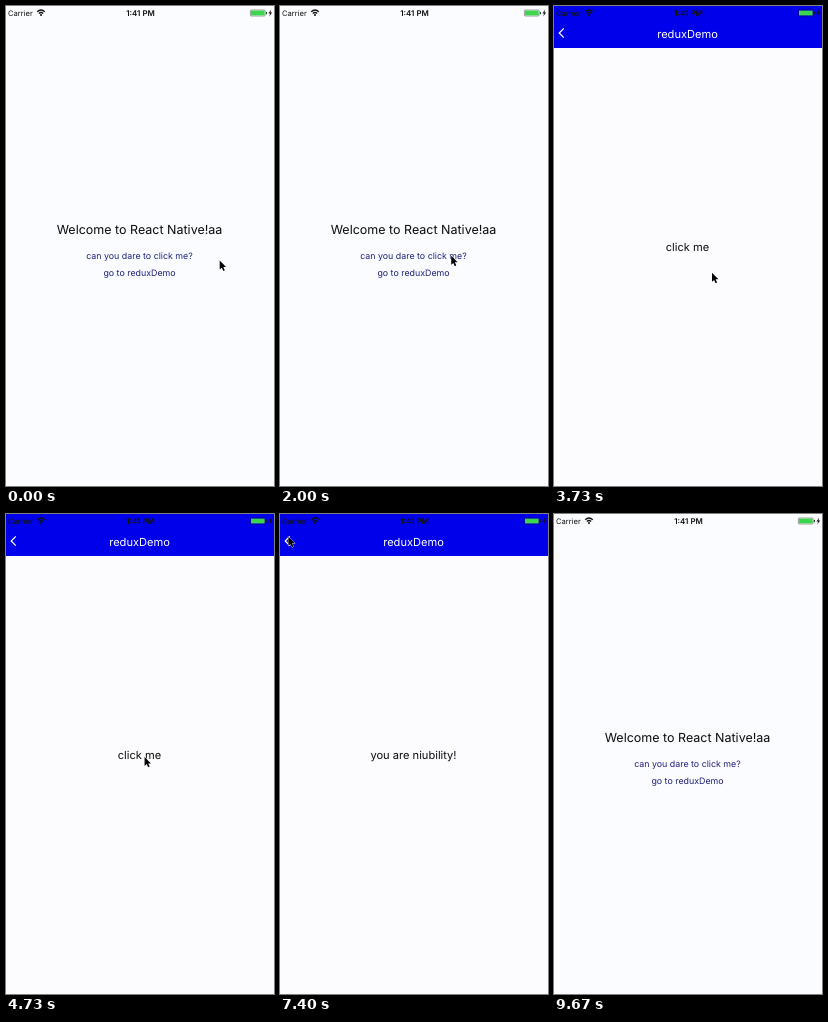
Recreate the animation shown at these times as an HTML page. Size 268x480 px, loop 9.74 s.

```html
<!DOCTYPE html>
<html lang="en">
<head>
<meta charset="utf-8">
<style>
  html, body { margin: 0; width: 100%; height: 100%; overflow: hidden; background: #fcfcfe; }
  svg { display: block; width: 268px; height: 480px; }
  text { font: 11.1px Inter, Roboto, sans-serif; text-anchor: middle; text-rendering: geometricPrecision; }
  .title { font-size: 12.5px; }
  .link { font-size: 8.85px; }
  .status { font-size: 7.6px; }
</style>
</head>
<body>
<svg viewBox="0 0 268 480">
  <g id="home">
    <rect width="268" height="480" fill="#fafcff"/>
    <text class="title" x="133.5" y="228" fill="#0c0c0c">Welcome to React Native!aa</text>
    <g fill="#20207c">
      <text class="link" x="133.5" y="252.7">can you dare to click me?</text>
      <text class="link" x="133.5" y="270">go to reduxDemo</text>
    </g>
  </g>

  <g id="demo">
    <rect width="268" height="480" fill="#fcfcfe"/>
    <rect width="268" height="42" fill="#0000ea"/>
    <path d="M9.8 22.4 5.2 27l4.6 4.6" fill="none" stroke="#fff" stroke-width="1.2"/>
    <text x="133.5" y="31.5" fill="#fff">reduxDemo</text>
    <text id="message" x="133.5" y="245" fill="#0c0c0c"></text>
  </g>

  <g id="statusBar" fill="#111">
    <text class="status" x="2" y="10" style="text-anchor: start">Carrier</text>
    <path d="M31.2 5.8q3.8-3.6 7.6 0M32.8 7.5q2.2-2 4.4 0" fill="none" stroke="#111" stroke-width="1.2"/>
    <circle cx="35" cy="9" r="1"/>
    <text class="status" x="134.5" y="10" style="font-size: 7.9px; font-weight: 600">1:41 PM</text>
    <rect x="244.4" y="4" width="14.8" height="6" rx="1" fill="none" stroke="#111" stroke-width=".4"/>
    <rect x="245" y="4.6" width="13.6" height="4.8" fill="#3cd64c"/>
    <path d="M259.9 6v2.2h.9V6zM265.1 3.6l-2.6 4h1.6l-.8 3 2.8-4h-1.6z"/>
  </g>

  <path id="cursor" d="M0 0v9l2.1-1.9 1.5 3.3 1.5-.7-1.5-3.2h2.8z"
        fill="#000" stroke="#fff" stroke-width=".8" paint-order="stroke"/>
</svg>

<script>
const LOOP = 9740, SLIDE = 270, WIDTH = 268;
const PUSH = 3300, TAP = 5400, POP = 7790;

// Pointer path: time, x, y
const path = [
  [0, 213.7, 254.6], [900, 213.7, 254.6], [1800, 171.2, 249.8], [2200, 171.2, 249.8],
  [2900, 158, 266.8], [4200, 158, 266.8], [4750, 138.5, 242.8], [6500, 138.5, 242.8],
  [7250, 8.4, 22.8], [8600, 8.4, 22.8], [9000, -14, 16], [LOOP, -14, 16]
];

const byId = id => document.getElementById(id);
const [home, demo, message, cursor] = ['home', 'demo', 'message', 'cursor'].map(byId);
const clamp = v => Math.max(0, Math.min(1, v));
const easeOut = v => 1 - (1 - v) ** 3;
const smooth = v => v * v * (3 - 2 * v);
const slide = (t, start) => easeOut(clamp((t - start) / SLIDE));
const place = (el, x, y = 0) => el.setAttribute('transform', `translate(${x} ${y})`);

function pointerAt(t) {
  const i = path.findIndex(p => p[0] > t);
  const [a, b] = [path[i - 1], path[i]];
  const k = smooth((t - a[0]) / (b[0] - a[0]));
  return [a[1] + (b[1] - a[1]) * k, a[2] + (b[2] - a[2]) * k];
}

function draw() {
  const t = performance.now() % LOOP;
  const shown = slide(t, PUSH) - slide(t, POP);
  place(home, -0.3 * WIDTH * shown);
  place(demo, WIDTH * (1 - shown));
  message.textContent = t < TAP ? 'click me' : 'you are niubility!';
  place(cursor, ...pointerAt(t));
  requestAnimationFrame(draw);
}
draw();
</script>
</body>
</html>
```
